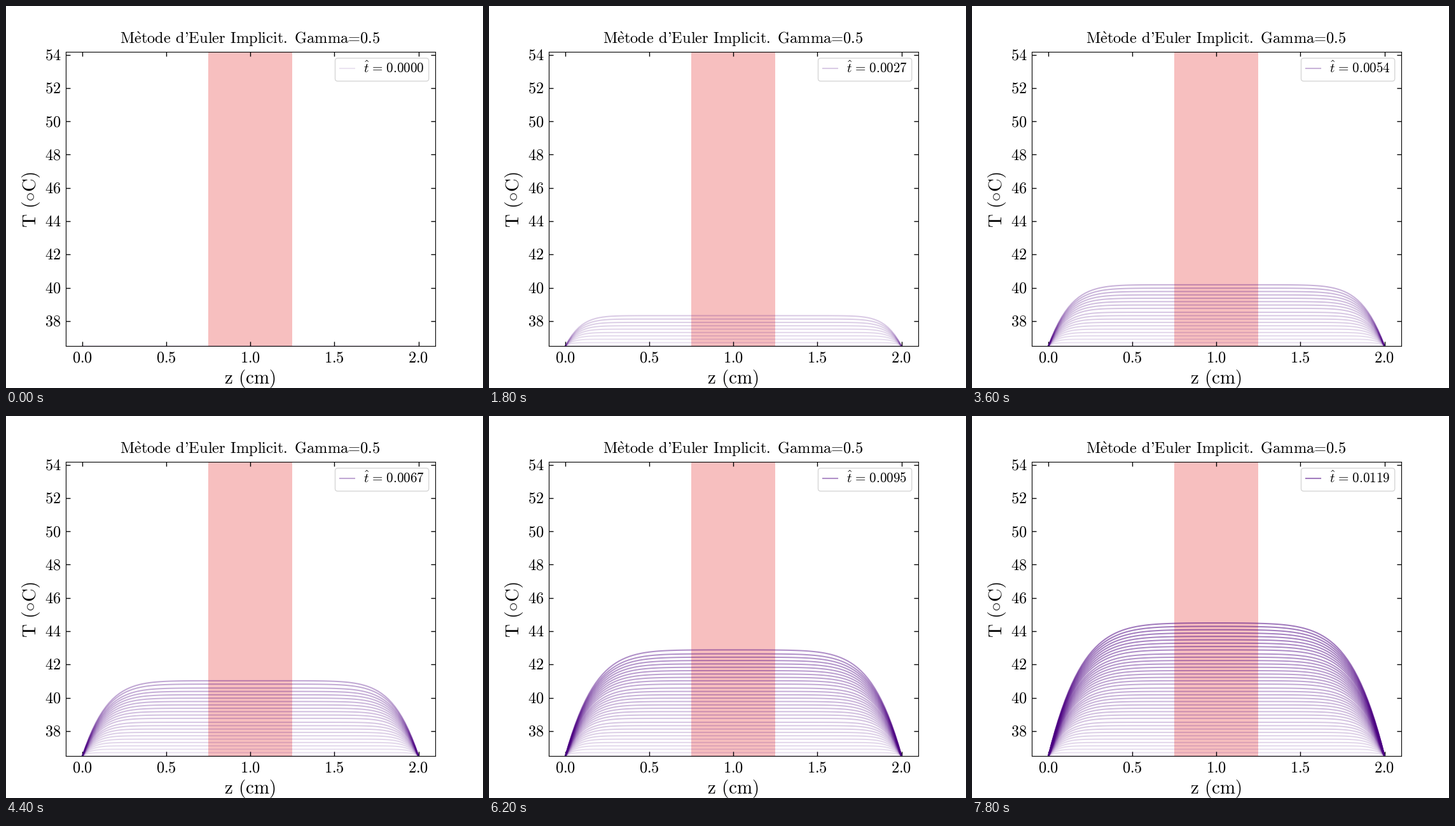
Recreate the animation shown at these times as a matplotlib script. Size 750x600 px, loop 8000 ms.

```python
import numpy as np
import matplotlib.pyplot as plt
from matplotlib.animation import FuncAnimation
from matplotlib.lines import Line2D
from matplotlib.patches import FancyBboxPatch

plt.rcParams["mathtext.fontset"] = "cm"

W, H, DPI = 750, 600, 100
FRAMES, INTERVAL = 40, 200
NODES, DT, GAMMA = 101, 0.00005, 0.5
T0, HEAT = 36.5, 0.03374          # wall temperature, heating per time step
STEPS, CURVES = 500, 82           # full run and number of curves in it
GAP = r"\hspace{0.38}"


def implicit_euler(steps):
    """Temperature profiles of a uniformly heated rod with fixed ends."""
    n = NODES - 2
    matrix = (1 + 2 * GAMMA) * np.eye(n) - GAMMA * (np.eye(n, k=1) + np.eye(n, k=-1))
    inverse = np.linalg.inv(matrix)
    rise = np.zeros((steps + 1, NODES))
    for k in range(steps):
        rise[k + 1, 1:-1] = inverse @ (rise[k, 1:-1] + HEAT)
    return T0 + rise


def step_at(i):
    return STEPS * i // CURVES


def opacity(i):
    return 0.11 + 0.0105 * i


def label(x, y, tex, size, **kw):
    """Text with its baseline at pixel (x, y), counted from the top left."""
    kw = {"ha": "center", "va": "baseline", **kw}
    return fig.text(x / W, 1 - y / H, f"${tex}$", fontsize=size, **kw)


def time_text(i):
    return (r"$\hat{t}\hspace{0.117}=\hspace{0.117}\text{%.4f}$"
            % (step_at(i) * DT))


fig = plt.figure(figsize=(W / DPI, H / DPI), dpi=DPI, facecolor="white")
ax = fig.add_axes([0.125, 0.11, 0.775, 0.77])
ax.set_xlim(-0.1, 2.1)
ax.set_ylim(T0, 54.18)
ax.set_xticks(np.arange(0, 2.1, 0.5))
ax.set_yticks(range(38, 55, 2))
ax.tick_params(direction="in", length=5, width=1, top=True, right=True,
               labelbottom=False, labelleft=False)
ax.axvspan(0.75, 1.25, color="lightcoral", alpha=0.5, lw=0)

# Titles and tick labels
label(383.5, 59.5, r"\text{M}\grave{\mathrm{e}}\text{tode}" + GAP + r"\text{d'Euler}"
      + GAP + r"\text{Implicit.}\hspace{0.506}\text{Gamma=0.5}", 17.6)
label(384, 593, r"\text{z}" + GAP + r"\text{(cm)}", 20.9)
label(47, 304, r"\mathrm{T" + GAP + r"(\circ C)}", 20.9,
      rotation=90, rotation_mode="anchor")
for v in ax.get_xticks():
    px = ax.transData.transform((v, T0))[0]
    label(px - 0.5, 559, r"\text{%.1f}" % v, 17.6)
for v in ax.get_yticks():
    py = H - ax.transData.transform((0, v))[1]
    label(86.5, py + 8, r"\text{%d}" % v, 17.6, ha="right")

# Legend
fig.add_artist(FancyBboxPatch((517.5, H - 118), 147.2, 36,
                              boxstyle="round,pad=0,rounding_size=4",
                              transform=None, fc="white", ec="0.8",
                              alpha=0.8, lw=1.0))
key = Line2D([525, 548], [H - 98, H - 98], transform=None, color="indigo", lw=1.5)
fig.add_artist(key)
clock = label(562.5, 105, r"\text{0}", 15.2, ha="left")

z = np.linspace(0, 2, NODES)
profiles = implicit_euler(step_at(FRAMES - 1))
curves = [ax.plot(z, profiles[step_at(i)], color="indigo", lw=1.5,
                  alpha=opacity(i))[0] for i in range(FRAMES)]


def update(i):
    for k, curve in enumerate(curves):
        curve.set_visible(k <= i)
    key.set_alpha(opacity(i))
    clock.set_text(time_text(i))
    return [*curves, key, clock]


anim = FuncAnimation(fig, update, frames=FRAMES, interval=INTERVAL,
                     init_func=lambda: update(0), repeat=True, repeat_delay=0)
plt.show()
```
